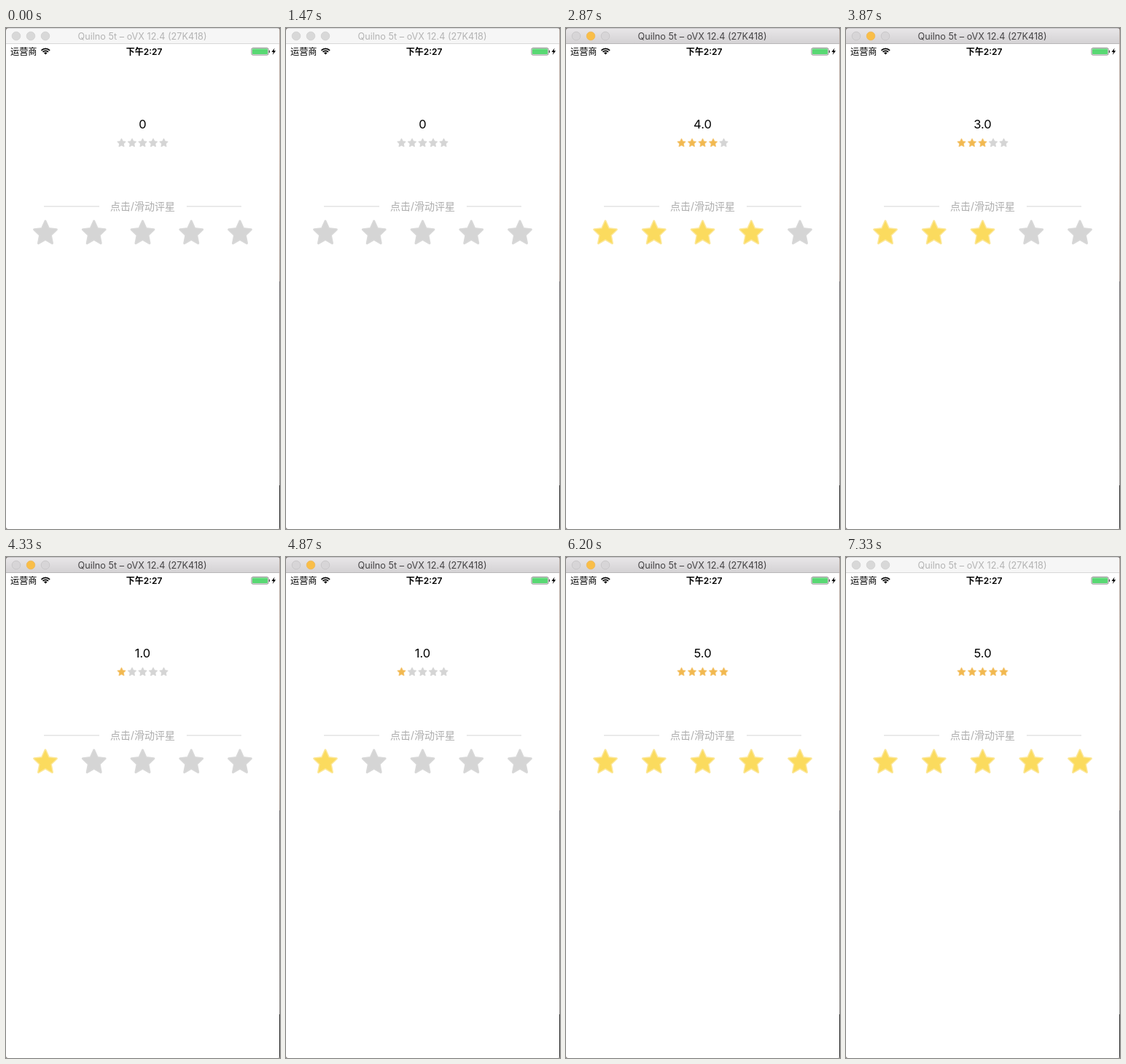
Recreate the animation shown at these times as an HTML page with a canvas. Size 376 by 688 pixels, loop 7.39 s.

```html
<!DOCTYPE html>
<html lang="zh-CN">
<head>
<meta charset="utf-8">
<title>Star rating</title>
<style>
  html, body { margin: 0; width: 100%; height: 100%; overflow: hidden; background: #fff; }
  canvas { display: block; width: 376px; height: 688px; }
</style>
</head>
<body>
<canvas id="stage"></canvas>
<script>
const W = 376, H = 688, LOOP = 7390;
const FOCUS_ON = 1530, FOCUS_OFF = 7270;
const FONT = '"Inter", "Noto Sans CJK SC", "Noto Sans CJK", sans-serif';

// Star colours: body and softer rim
const GREY = ['#d5d5d5', '#d8d8d8'];
const YELLOW = ['#fbdb5e', '#fce799'];
const AMBER = ['#f2b950', '#f5cc85'];

// [time in ms, rating]
const ratings = [
  [0, 0],
  [2070, 1], [2270, 2], [2600, 3], [2800, 4], [3070, 5],
  [3600, 4], [3800, 3], [4070, 2], [4300, 1],
  [5000, 2], [5470, 3], [5600, 4], [6000, 5]
];

const canvas = document.getElementById('stage');
const ctx = canvas.getContext('2d');
const dpr = window.devicePixelRatio || 1;
canvas.width = W * dpr;
canvas.height = H * dpr;

function rect(x, y, w, h, fill) {
  ctx.fillStyle = fill;
  ctx.fillRect(x, y, w, h);
}

function text(str, x, y, size, color, weight = 400, align = 'center') {
  ctx.font = `${weight} ${size}px ${FONT}`;
  ctx.textAlign = align;
  ctx.textBaseline = 'alphabetic';
  ctx.fillStyle = color;
  ctx.fillText(str, x, y);
}

function gradient(y0, y1, ...colors) {
  const g = ctx.createLinearGradient(0, y0, 0, y1);
  colors.forEach((c, i) => g.addColorStop(i / (colors.length - 1), c));
  return g;
}

function star(x, y, r, round, [body, rim]) {
  ctx.beginPath();
  for (let i = 0; i < 10; i++) {
    const a = -Math.PI / 2 + i * Math.PI / 5;
    const d = i % 2 ? r * 0.48 : r;
    ctx.lineTo(x + d * Math.cos(a), y + d * Math.sin(a) * 1.04);
  }
  ctx.closePath();
  ctx.lineWidth = round;
  ctx.lineJoin = 'round';
  ctx.strokeStyle = rim;
  ctx.stroke();
  ctx.fillStyle = body;
  ctx.fill();
}

function starRow(y, step, r, round, color, value) {
  for (let i = 0; i < 5; i++) {
    star(187.5 + (i - 2) * step, y, r, round, i < value ? color : GREY);
  }
}

function titleBar(active) {
  rect(0, 0, W, 22, active ? gradient(0, 22, '#e9e7e9', '#d3d1d3') : '#f6f6f6');
  rect(0, 21, W, 1, active ? '#b9b7b9' : '#d8d8d8');
  rect(0, 0, W, 0.6, active ? '#b2b0b2' : '#c4c4c4');
  [14, 34, 54].forEach((x, i) => {
    const lit = active && i === 1;
    ctx.beginPath();
    ctx.arc(x, 11, 5.8, 0, Math.PI * 2);
    ctx.fillStyle = lit ? '#f9be48' : active ? '#d7d5d7' : '#d8d8d8';
    ctx.strokeStyle = lit ? '#ecb65a' : active ? '#c5c3c5' : '#cfcfcf';
    ctx.lineWidth = 0.8;
    ctx.fill();
    ctx.stroke();
  });
  text('Quilno 5t – oVX 12.4 (27K418)', 187, 16, 12.7, active ? '#454345' : '#b4b4b4');
}

function wifi(x, y) {
  ctx.strokeStyle = ctx.fillStyle = '#000';
  ctx.lineWidth = 1.7;
  const from = -Math.PI * 0.75, to = -Math.PI * 0.25;
  for (const r of [8.2, 5.3]) {
    ctx.beginPath();
    ctx.arc(x, y, r, from, to);
    ctx.stroke();
  }
  ctx.beginPath();
  ctx.moveTo(x, y);
  ctx.arc(x, y, 3.2, from, to);
  ctx.fill();
}

function battery() {
  ctx.beginPath();
  ctx.roundRect(337, 27.5, 23, 9.6, 1.8);
  ctx.strokeStyle = '#555';
  ctx.lineWidth = 0.7;
  ctx.stroke();
  ctx.beginPath();
  ctx.roundRect(338, 28.5, 21, 7.6, 0.8);
  ctx.fillStyle = '#58d873';
  ctx.fill();
  rect(360.8, 30.7, 1.2, 3.2, '#444');

  ctx.beginPath();
  [[368.6, 27.5], [364.5, 33], [367, 33], [365.8, 37], [370.2, 31.3], [367.6, 31.3]]
    .forEach(p => ctx.lineTo(...p));
  ctx.fillStyle = '#000';
  ctx.fill();
}

function statusBar() {
  text('运营商', 6, 36.8, 12.2, '#000', 400, 'left');
  wifi(54.3, 36.6);
  text('下午2:27', 189.5, 37, 12, '#000', 600);
  battery();
}

function windowEdge() {
  rect(375, 0, 1, 348, gradient(0, 348, '#b5a8a2', '#cdbcb2', '#aca09a'));
  rect(375, 348, 1, 280, gradient(348, 628, '#757274', '#9a9694'));
  rect(375, 628, 1, 60, '#303030');
  // Rounded corners of the window
  const corners = [[0, 0, 1, 1], [W, 0, -1, 1], [0, H, 1, -1], [W, H, -1, -1]];
  ctx.fillStyle = '#77706e';
  for (const [x, y, sx, sy] of corners) {
    const r = sy > 0 ? 4 : 3;
    ctx.beginPath();
    ctx.moveTo(x, y);
    ctx.lineTo(x + sx * r, y);
    ctx.quadraticCurveTo(x, y, x, y + sy * r);
    ctx.fill();
  }
}

function draw(t) {
  const active = t >= FOCUS_ON && t < FOCUS_OFF;
  const value = ratings.filter(([at]) => at <= t).pop()[1];

  ctx.setTransform(dpr, 0, 0, dpr, 0, 0);
  rect(0, 0, W, H, '#fff');
  titleBar(active);
  statusBar();

  text(value ? value.toFixed(1) : '0', 187.5, 138.2, 16.5, '#000');
  starRow(157.9, 14.5, 5.5, 1.5, AMBER, value);

  rect(52, 244.6, 76, 0.8, '#cbcbcb');
  rect(248, 244.6, 75, 0.8, '#cbcbcb');
  text('点击/滑动评星', 187.5, 250.3, 14, '#adadad');
  starRow(282, 66.75, 16.2, 3, YELLOW, value);
  windowEdge();
}

const start = performance.now();
function frame() {
  draw((performance.now() - start) % LOOP);
  requestAnimationFrame(frame);
}
frame();
</script>
</body>
</html>
```
